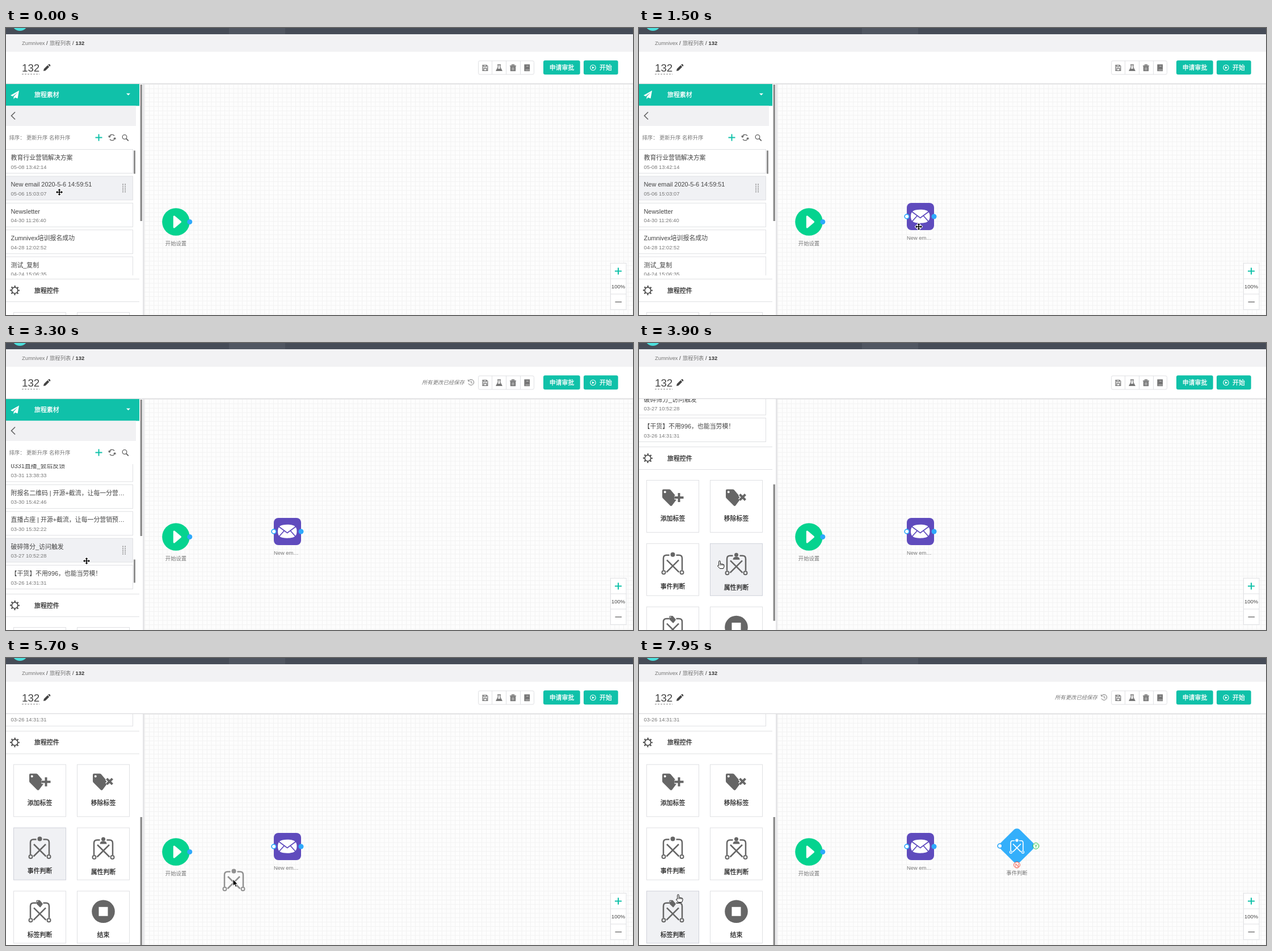
Recreate the animation shown at these times as an HTML page. Size 1105 by 507 pixels, loop 8 s.

```html
<!DOCTYPE html>
<html lang="zh-CN">
<head>
<meta charset="utf-8">
<title>旅程</title>
<style>
html, body { margin: 0; width: 100%; height: 100%; overflow: hidden; background: #fff; }
svg { display: block; }
text { font: 10.9px "Liberation Sans", "Noto Sans CJK SC", "Noto Sans CJK", sans-serif; fill: #444; }
.s { font-size: 9.36px; fill: #777; }
.m { fill: #222; stroke: #222; stroke-width: .25; }
.w { fill: #fff; stroke: #fff; stroke-width: .3; }
.c { text-anchor: middle; }
.b { fill: #fff; stroke: #dfe0e3; }
.on .b { fill: #f0f1f4; stroke: #cfd2da; }
.item .dots { display: none; }
.item.on .dots { display: inline; }
.item.on .b { stroke: #e0e1e4; }
.l { fill: none; stroke: currentColor; }
</style>
</head>
<body>
<svg id="stage" width="1105" height="507" viewBox="0 0 1105 507">
  <defs>
    <pattern id="grid" x="244.5" y="99" width="7.81" height="7.81" patternUnits="userSpaceOnUse">
      <path d="M.5 0V8M0 .5H8" stroke="#f2f2f2" fill="none"/>
    </pattern>
    <path id="tag" d="M-18.500-12q0-2 2-2h10q1.600 0 2.700 1L7 -.2q1.800 1.900 0 3.800L-1.200 14.500q-1.800 1.800-3.600 0L-17.500 1.800q-1-1-1-2.500zM-13.800-11.200a2 2 0 1 0 .1 0z" fill="currentColor" fill-rule="evenodd"/>
    <g id="fork" class="l" stroke-width="2.500">
      <path d="M-6-15.500H-11q-5.500 0-5.500 5.500V11M6-15.500H11q5.500 0 5.500 5.500V11M-11 14.500 10.500-7M11 14.500-10.500-7"/>
      <circle cx="-16" cy="15" r="3" stroke-width="2"/><circle cx="16" cy="15" r="3" stroke-width="2"/>
    </g>
    <g id="event"><use href="#fork"/><circle cy="-16.500" r="4" fill="currentColor"/></g>
    <g id="person"><use href="#fork"/><circle cy="-17" r="3.500" fill="currentColor"/><path d="M-6-8.500q0-5 6-5t6 5z" fill="currentColor"/></g>
    <g id="label"><use href="#fork"/><use href="#tag" transform="translate(2 -14.500) scale(.43)"/></g>
    <g id="end"><circle r="20.300" fill="currentColor"/><rect x="-8" y="-8" width="16" height="16" fill="#fff"/></g>
    <path id="plus" d="M11-7.500V8.500M3 .5H19"/>
    <path id="times" d="M6-5 16 5M16-5 6 5"/>
    <g id="add" fill="none"><use href="#tag"/><use href="#plus" stroke="#fff" stroke-width="7"/><use href="#plus" stroke="currentColor" stroke-width="4"/></g>
    <g id="remove" fill="none"><use href="#tag"/><use href="#times" stroke="#fff" stroke-width="7"/><use href="#times" stroke="currentColor" stroke-width="4"/></g>
    <path id="cross" d="M0-6 2.500-3.300H.8V-.8H3.300V-2.500L6 0 3.300 2.500V.8H.8V3.300H2.500L0 6-2.500 3.300H-.8V.8H-3.300V2.500L-6 0-3.300-2.500V-.8H-.8V-3.300H-2.500z"/>
    <g id="move"><use href="#cross" stroke="#fff" stroke-width="2" stroke-linejoin="round"/><use href="#cross"/></g>
    <path id="arrow" d="M0 0V11.500L2.700 9.100 4.700 13.500 6.700 12.600 4.800 8.400H8.300z" stroke="#fff" stroke-width=".9"/>
    <path id="hand" d="M-1.300 8V1.200a1.300 1.300 0 0 1 2.600 0V5.200q1.600-1 2.400.4 1.700-.7 2.300.6 2-.5 2 1.400V10L6.600 13.500H.6L-3.300 9.300Q-3.700 7.300-1.300 8zM1.300 5.200V8M3.700 5.600V8M6 6.200V8.300" fill="#fff" stroke="#111" stroke-width="1"/>
  </defs>

  <rect width="1105" height="507" fill="#fff"/>
  <rect width="1105" height="11" fill="#464c57"/>
  <rect x="393" width="99" height="11" fill="#505661"/>
  <circle cx="24.500" cy="-9" r="14" fill="#4cdfdc"/>
  <rect y="11" width="1105" height="31" fill="#f2f2f4"/>
  <text class="s" x="28" y="30">Zumnivex</text>
  <text class="s" x="71" y="30" style="fill:#333">/</text>
  <text class="s" x="77" y="30">旅程列表</text>
  <text class="s" x="117" y="30" style="fill:#333">/</text>
  <text class="s" x="122.500" y="30" style="fill:#333;font-weight:700">132</text>
  <text x="28" y="76.500" style="font-size:18.700px">132</text>
  <path d="M28 81.500H59" stroke="#888" stroke-dasharray="3 2"/>
  <path d="M66 76 66.800 72.300 73.300 65.800 76.200 68.700 69.700 75.200zM74.200 65 75.200 64Q76.200 63.300 77.200 64.300L78 65.200Q78.800 66.200 78 67L77.100 67.900z" fill="#444"/>

  <g id="saved">
    <text class="s" x="733" y="73" style="font-style:italic">所有更改已经保存</text>
    <g class="l" color="#777"><path d="M815.500 66.500A5 5 0 1 1 815 71.500M814.500 64.500V67.300H817.500M819.700 66.500V70L822 71.300"/></g>
  </g>

  <rect x="832.500" y="58" width="98" height="24" rx="2.500" class="b"/>
  <path d="M856.500 58V82M881.500 58V82M906.500 58V82" stroke="#dfe0e3"/>
  <g class="l" color="#777" stroke-width="1.300">
    <path d="M840 65.700H847L848.800 67.500V75.300H840zM842 66V68.700H846.300V66M842 75V71.500H847V75"/>
    <path d="M866 65H872M867.300 65V69L864.300 75.300H873.700L870.700 69V65"/>
    <path d="M865.800 72.500H872.200L873.700 75.300H864.300z" fill="#777"/>
    <path d="M888 67H899M891.500 66.500V65H895.500V66.500"/>
    <path d="M889.500 68.500H897.500V75.500H889.500z" fill="#777"/>
    <path d="M892.200 69.500V74.500M894.800 69.500V74.500" stroke="#fff" stroke-width=".8"/>
    <path d="M914 65H922.500V75.500H914z" fill="#777"/>
    <path d="M915.500 74H922.500M917 67.500H921" stroke="#ddd" stroke-width=".8"/>
  </g>
  <rect x="947" y="57.300" width="64.700" height="25" rx="3" fill="#10c1a9"/>
  <rect x="1018" y="57.300" width="60.700" height="25" rx="3" fill="#10c1a9"/>
  <text class="w c" x="979.500" y="74">申请审批</text>
  <text class="w" x="1046" y="74">开始</text>
  <circle cx="1034.500" cy="70" r="4.700" class="l" color="#fff" stroke-width="1.100"/>
  <path d="M1033 67.700 1037 70 1033 72.300z" fill="#fff"/>

  <rect x="243" y="98" width="862" height="409" fill="#fdfdfd"/>
  <rect x="243" y="98" width="862" height="409" fill="url(#grid)"/>
  <path d="M242.500 98V507" stroke="#e6e6e8" stroke-width="3"/>
  <path d="M0 98.500H1105" stroke="#dcdcde" stroke-width="1.500"/>

  <circle cx="299.500" cy="342.500" r="24.300" fill="#05d38f"/>
  <path d="M296.300 333V352L307.500 342.500z" fill="#fff" stroke="#fff" stroke-width="3" stroke-linejoin="round"/>
  <circle cx="323.800" cy="342.500" r="4.500" fill="#2ea9fb"/>
  <text class="s c" x="299.500" y="383.500">开始设置</text>

  <g id="mail">
    <rect x="472" y="309" width="48" height="48" rx="8" fill="#5f4bbd"/>
    <path d="M495.700 320.700C508 320.700 512.500 324 512.500 332.700S508 344.700 495.700 344.700 479 341.500 479 332.700 483.500 320.700 495.700 320.700z" fill="#fff"/>
    <path d="M481 324.500 495.700 335.500 510.500 324.500M481.500 341.500 490 332M510 341.500 501.500 332" class="l" color="#5f4bbd" stroke-width="1.800"/>
    <circle cx="472" cy="333" r="3.900" fill="#fff" stroke="#2ea9fb" stroke-width="1.700"/>
    <circle cx="520" cy="333" r="4.500" fill="#2ea9fb"/>
    <text class="s" x="472" y="374">New em…</text>
  </g>

  <g id="judge">
    <rect x="642" y="308" width="48" height="48" rx="8" fill="#34affb" transform="rotate(45 666 332)"/>
    <use href="#event" transform="translate(666 333) scale(.66)" color="#fff"/>
    <circle cx="636" cy="332" r="3.900" fill="#fff" stroke="#2ea9fb" stroke-width="1.700"/>
    <circle cx="699.500" cy="332" r="5.300" fill="#fff" stroke="#1fbf3f"/>
    <text class="s c" x="699.500" y="335.300" style="fill:#1fbf3f">Y</text>
    <circle cx="666" cy="365.500" r="5.300" fill="#fff" stroke="#f0402f"/>
    <text class="s c" x="666" y="368.800" style="fill:#f0402f">N</text>
    <text class="s c" x="666" y="383">事件判断</text>
  </g>

  <rect x="1065.500" y="415.500" width="27.500" height="82" class="b"/>
  <path d="M1065 443H1093M1065 470H1093" stroke="#dfe0e3"/>
  <path d="M1073 429.500H1085M1079 423.500V435.500" stroke="#10c1a9" stroke-width="2"/>
  <text class="s c" x="1079" y="460" style="fill:#444">100%</text>
  <path d="M1073.500 484H1085" stroke="#777" stroke-width="1.500"/>

  <svg y="99" width="241" height="408" viewBox="0 99 241 408">
    <rect y="99" width="241" height="408" fill="#fff"/>
    <g id="side">
      <rect y="98" width="235" height="39.500" fill="#10c1a9"/>
      <path d="M8 119 23 110.500 20.500 124.500 15.800 122.700 13.500 125.800V121.500L20 114 11.800 120.700z" fill="#fff"/>
      <text class="w" x="50" y="122">旅程素材</text>
      <path d="M212 115.500H219L215.500 119z" fill="#fff"/>
      <rect y="137.500" width="229" height="35.500" fill="#f1f1f3"/>
      <path d="M16 148.500 9.500 155 16 161.500" class="l" color="#666" stroke-width="1.700"/>
      <text class="s" x="5.500" y="196.500">排序：</text>
      <text class="s" x="36" y="196.500">更新升序 名称升序</text>
      <path d="M157.500 193.500H169.500M163.500 187.500V199.500" stroke="#10c1a9" stroke-width="2"/>
      <g class="l" color="#666" stroke-width="1.300">
        <path d="M182 192.500A5 5 0 0 1 191 190.500M192 194.500A5 5 0 0 1 183 196.500M180.500 190.500 182 193 184.500 191.500M193.500 196.500 192 194 189.500 195.500"/>
        <circle cx="209" cy="192.500" r="3.800"/><path d="M212 195.500 215.800 199.300" stroke-width="1.800"/>
      </g>
      <svg y="214" width="224" height="223" viewBox="0 214 224 223"><g id="list"></g></svg>
      <rect id="listBar" x="225" y="216.500" width="3" height="41" fill="#8e8e8e"/>
      <path d="M0 443.500H235M0 483.500H235" stroke="#dfe0e3"/>
      <circle cx="15.500" cy="463.500" r="5.300" class="l" color="#444" stroke-width="1.700"/>
      <circle cx="15.500" cy="463.500" r="7.200" class="l" color="#444" stroke-width="2.400" stroke-dasharray="2.200 3.455" stroke-dashoffset="1.100"/>
      <text class="m" x="50" y="467.500">旅程控件</text>
      <g id="tiles"></g>
    </g>
    <rect id="sideBar" x="236.500" y="100" width="3.500" height="241" fill="#8e8e8e"/>
  </svg>

  <g id="ghostItem" opacity=".7"></g>
  <use id="ghostIcon" href="#event" color="#666" opacity=".7"/>
  <use id="cursor"/>
</svg>

<script>
const $ = id => document.getElementById(id);
const STEP = 150, LOOP = 8000, PITCH = 47.4, TOP = 214.5, LIST_END = 864.8, SIDE_END = 314.3;

const head = ['教育行业营销解决方案|05-08 13:42:14', 'New email 2020-5-6 14:59:51|05-06 15:03:07',
  'Newsletter|04-30 11:26:40', 'Zumnivex培训报名成功|04-28 12:02:52', '测试_复制|04-24 15:06:35'];
const tail = ['0331直播_会后反馈|03-31 13:38:33', '附报名二维码 / 开源+截流，让每一分营…|03-30 15:42:46',
  '直播占座 / 开源+截流，让每一分营销预…|03-30 15:32:22', '破碎筛分_访问触发|03-27 10:52:28',
  '【干货】不用996，也能当劳模！|03-26 14:31:31'];
const topics = ['直播_报名成功', '会后反馈_复制', '访问触发_测试', '行业营销解决方案'];
const middle = Array.from({ length: 13 }, (_, i) => {
  const day = 23 - i;
  return `04${day}${topics[i % 4]}|04-${day} 1${i % 8}:${20 + i * 2}:${12 + i * 3}`;
});

const dots = Array.from({ length: 10 }, (_, i) =>
  `<rect x="${205.3 + i % 2 * 4}" y="${13.5 + (i >> 1) * 3.3}" width="1.600" height="1.600" fill="#777"/>`).join('');
const itemBody = row => {
  const [title, date] = row.split('|');
  return `<rect class="b" x="-2" width="225.500" height="42"/><text x="8.500" y="18.500">${title.replace(' / ', ' | ')}</text>
    <text class="s" x="8.500" y="34">${date}</text><g class="dots">${dots}</g>`;
};
$('list').innerHTML = [...head, ...middle, ...tail].map((row, i) =>
  `<g class="item" transform="translate(0 ${TOP + PITCH * i})">${itemBody(row)}</g>`).join('');
$('ghostItem').innerHTML = `<g class="item on">${itemBody(head[1])}</g>`;

const tiles = [['add', '添加标签', 71.5, 30], ['remove', '移除标签', 71.5, 30], ['event', '事件判断', 79.5, 36],
  ['person', '属性判断', 81.5, 37], ['label', '标签判断', 81, 36.5], ['end', '结束', 81.5, 36]];
const tileX = i => 13.5 + i % 2 * 112;
const tileY = i => 502.5 + (i >> 1) * 111.8;
$('tiles').innerHTML = tiles.map(([icon, name, base, cy], i) =>
  `<g transform="translate(${tileX(i)} ${tileY(i)})"><rect class="b" width="92" height="92"/>
   <use href="#${icon}" x="46" y="${cy}" color="#666"/><text class="m c" x="46" y="${base}">${name}</text></g>`).join('');

// Each key is [time, ...values]
const path = [[0, 94, 290], [150, 190, 311], [300, 300, 335], [450, 461, 358], [600, 500, 360], [750, 500, 360],
  [900, 493, 351], [1650, 493, 351], [1800, 468, 372], [2100, 300, 462], [2250, 205, 471], [2400, 160, 450],
  [2700, 142, 412], [2850, 140.5, 383], [3000, 142, 385], [4200, 142, 385], [4500, 80, 362], [4800, 72, 440],
  [5250, 58, 334], [5400, 98, 353], [5700, 400, 391], [6000, 662, 349], [6750, 662, 349], [6900, 620, 372],
  [7650, 165, 468], [7800, 108, 455], [7950, 69, 418]];
const listKeys = [[2850, 0], [3000, 500], [3150, 500], [3300, LIST_END]];
const sideKeys = [[3300, 0], [3600, 130], [3900, 260], [4200, SIDE_END]];

function at(keys, t) {
  const i = keys.findIndex(k => k[0] > t);
  if (i < 0) return keys[keys.length - 1].slice(1);
  if (!i) return keys[0].slice(1);
  const a = keys[i - 1], b = keys[i], f = (t - a[0]) / (b[0] - a[0]);
  return a.slice(1).map((v, j) => v + (b[j + 1] - v) * f);
}
const show = (id, on) => $(id).style.display = on ? '' : 'none';
const place = (id, x, y) => $(id).setAttribute('transform', `translate(${x} ${y})`);
const mark = (id, index) => [...$(id).children].forEach((el, i) => el.classList.toggle('on', i === index));

function draw(time) {
  const t = Math.floor(time % LOOP / STEP) * STEP;
  const within = (a, b) => t >= a && t < b;
  const [x, y] = at(path, t), [scroll] = at(listKeys, t), [side] = at(sideKeys, t);
  const dragItem = within(150, 1050), dragIcon = within(5400, 6150);

  let item = -1, tile = -1;
  if (t < 1800) item = 1;
  else if (within(5250, 6900)) tile = 2;
  else {
    const sy = y + side;
    if (x < 223 && sy > TOP && sy < 437) item = Math.floor((sy + scroll - TOP) / PITCH);
    tile = tiles.findIndex((_, i) => x > tileX(i) && x < tileX(i) + 92 && sy > tileY(i) && sy < tileY(i) + 92);
  }
  mark('list', item);
  mark('tiles', tile);

  place('list', 0, -scroll);
  place('side', 0, -side);
  $('listBar').setAttribute('y', 216.5 + 166 * scroll / LIST_END);
  $('sideBar').setAttribute('y', 100 + 181 * side / SIDE_END);

  show('listBar', t < 3900);
  show('saved', within(2100, 3900) || t >= 7200);
  show('mail', t >= 1500);
  show('judge', t >= 6450);
  show('ghostItem', dragItem);
  show('ghostIcon', dragIcon);
  place('ghostItem', x - 94, y - 28);
  place('ghostIcon', x + 1.5, y + 2);

  const waiting = within(150, 1500) || within(5400, 6450) || t === 2850;
  const shape = waiting ? 'arrow' : tile >= 0 ? 'hand' : item >= 0 ? 'move' : 'arrow';
  $('cursor').setAttribute('href', '#' + shape);
  place('cursor', x, y);
}

const start = performance.now();
(function tick() {
  draw(performance.now() - start);
  requestAnimationFrame(tick);
})();
</script>
</body>
</html>
```
